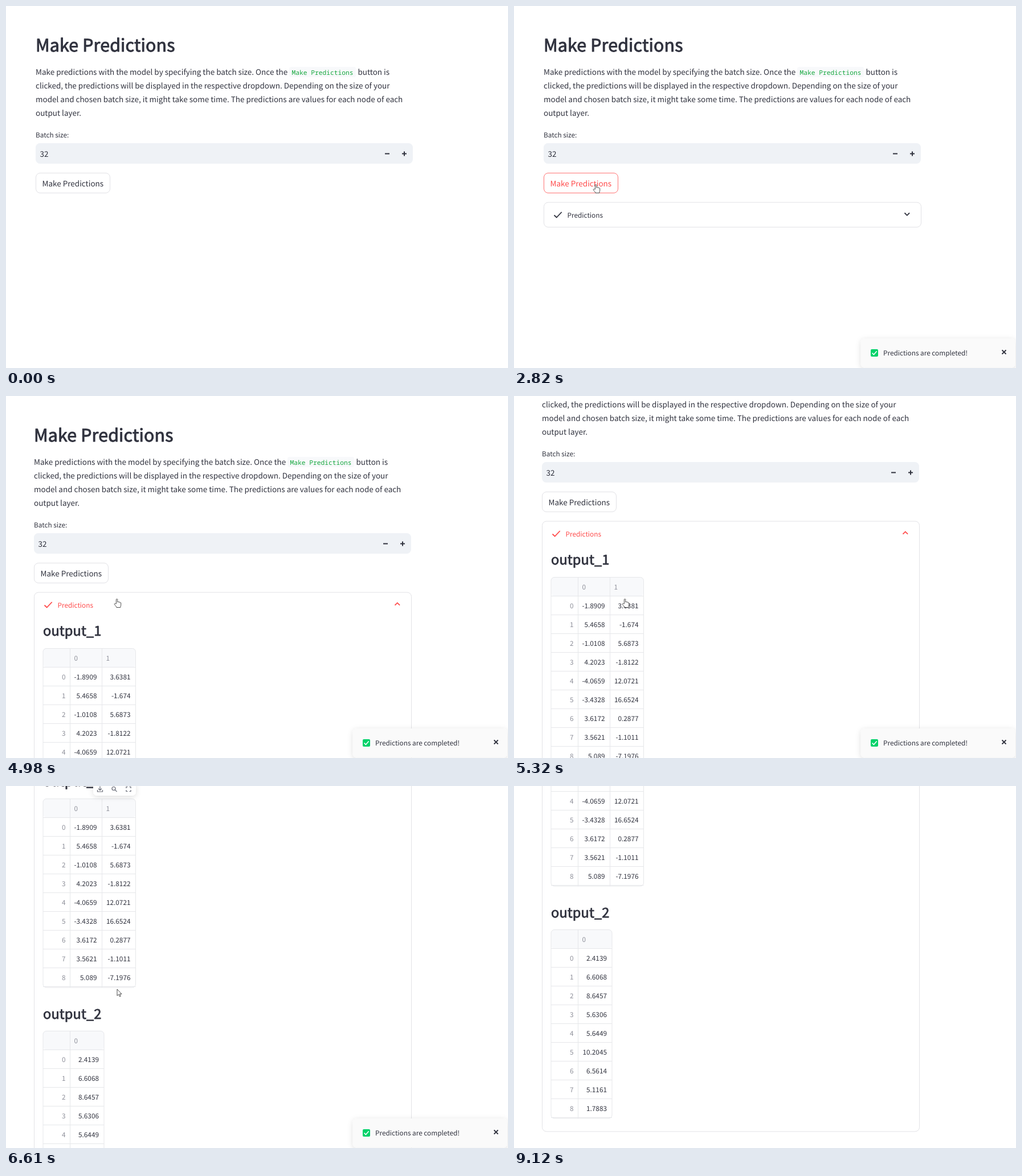
Write an HTML page that moves like this. It is 881x636 px and loops after 9570 ms.

```html
<!DOCTYPE html>
<html lang="en">
<head>
<meta charset="utf-8">
<title>Make Predictions</title>
<style>
  html, body { margin: 0; width: 100%; height: 100%; overflow: hidden; background: #fff; }
  svg { display: block; width: 100%; height: 100%; }
  text {
    font: 13.49px "Noto Sans CJK JP", "Noto Sans CJK SC", "Noto Sans CJK", "Open Sans", sans-serif;
    fill: #31333f; text-rendering: geometricPrecision; white-space: pre;
  }
  text.small { font-size: 11.8px; }
  /* Semibold: the regular weight, thickened by a thin outline */
  text.h2, text.h3 { stroke: #31333f; stroke-linejoin: round; letter-spacing: .005em; }
  text.h2 { font-size: 30.35px; stroke-width: 1; }
  text.h3 { font-size: 23.6px; stroke-width: .85; }
  text.code { font: 11.25px "Noto Sans Mono", "DejaVu Sans Mono", monospace; fill: #17a83f; }
  text.dim { fill: #8e909a; }
  text.right { text-anchor: end; }
  text.tint { fill: currentColor; }
  .line { fill: none; stroke: currentColor; stroke-width: 1.8; }
  .rule { fill: none; stroke: #e6e7ea; }
  .frame { fill: none; stroke: #e2e2e6; }
  .pointer { fill: #fff; stroke: #222; stroke-width: .8; stroke-linejoin: round; }
</style>
</head>
<body>
<svg viewBox="0 0 881 636" color="#31333f">
  <defs>
    <clipPath id="clip"><rect id="clipRect" x="50" y="344" width="668" height="0"/></clipPath>
    <filter id="shadow" x="-20%" y="-50%" width="140%" height="200%">
      <feDropShadow dx="0" dy="2" stdDeviation="5" flood-color="#000" flood-opacity=".13"/>
    </filter>
  </defs>

  <g id="page">
    <text class="h2" x="52" y="80">Make Predictions</text>
    <text x="52" y="120.5">Make predictions with the model by specifying the batch size. Once the</text>
    <rect x="497" y="107" width="117" height="18" rx="3.5" fill="#f8f9fb"/>
    <text class="code" x="501.5" y="120.5">Make Predictions</text>
    <text x="617.5" y="120.5">button is</text>
    <text x="52" y="144.5">clicked, the predictions will be displayed in the respective dropdown. Depending on the size of your</text>
    <text x="52" y="168.5">model and chosen batch size, it might take some time. The predictions are values for each node of each</text>
    <text x="52" y="192.5">output layer.</text>

    <text class="small" x="52" y="230.5">Batch size:</text>
    <rect x="52" y="241" width="662" height="36" rx="7.5" fill="#eff2f6"/>
    <text x="59.5" y="264.5">32</text>
    <path class="line" style="stroke-width:2" d="M665 259.5h8M695 259.5h8M699 255.5v8"/>

    <rect id="button" x="52.5" y="293.5" width="130" height="35" rx="7.5"/>
    <text id="buttonText" x="63.5" y="316.5">Make Predictions</text>

    <g id="panel">
      <rect id="panelFrame" class="frame" x="52.5" y="345" width="662" rx="7.5"/>
      <g id="header">
        <path class="line" d="M70.5 367.5l4.2 4 9-9.5"/>
        <text class="small tint" x="93.5" y="371.5">Predictions</text>
        <path id="chevron" class="line" d="M685.5 363.5l4.3 4.3 4.3-4.3"/>
      </g>
      <g id="outputs" clip-path="url(#clip)"></g>
      <g id="toolbar">
        <rect x="156" y="415" width="75" height="23" rx="7" fill="#fff" filter="url(#shadow)"/>
        <g fill="none" stroke="#666975" stroke-width="1.2">
          <path d="M168 421.5v6.5M165 425.5l3 3 3-3M163.5 428v3h9v-3"/>
          <circle cx="192" cy="425.5" r="3"/><path d="M194.2 427.7l3.3 3.3"/>
          <path d="M214 425v-2.5h2.5M219.5 422.5h2.5v2.5M222 428v2.5h-2.5M216.5 430.5h-2.5v-2.5"/>
        </g>
      </g>
      <path id="link" transform="translate(33 812) scale(.62)" fill="none" stroke="#555867" stroke-width="2"
        d="M10 13a5 5 0 0 0 7.54.54l3-3a5 5 0 0 0-7.07-7.07l-1.72 1.71M14 11a5 5 0 0 0-7.54-.54l-3 3a5 5 0 0 0 7.07 7.07l1.71-1.71"/>
    </g>
  </g>

  <g id="toast">
    <rect x="608.5" y="584" width="271.5" height="51.5" rx="7.5" fill="#fafafa" filter="url(#shadow)"/>
    <rect x="626" y="603" width="13" height="13" rx="2" fill="#00d26a"/>
    <path d="M628.5 609.5l2.9 3 5.2-6" fill="none" stroke="#fff" stroke-width="1.6"/>
    <text class="small" x="648" y="614">Predictions are completed!</text>
    <path class="line" d="M856.5 604.5l7 7M863.5 604.5l-7 7"/>
  </g>

  <g id="cursor">
    <path id="arrow" class="pointer" d="M0 0V11.5L2.7 9l1.8 4 1.8-.8L4.5 8.4H8z"/>
    <path id="hand" class="pointer" d="M-1.6 8V.8a1.2 1.2 0 0 1 2.4 0V5.2c.3-1 2-.9 2.2.2 .4-.8 2-.6 2 .5 .5-.5 1.7-.2 1.7 1V10.5c0 1.6-1 2.2-1 4H-1c0-1.6-3-4-3.6-5.4-.6-1.2.9-2 1.7-1.2z"/>
    <path id="beam" fill="none" stroke="#222" d="M-3-7.5h2.5M.5-7.5H3M0-7V7M-3 7.5h2.5M.5 7.5H3"/>
  </g>
</svg>

<script>
const LOOP = 9570, ROW = 33, RED = [255, 75, 75], INK = [49, 51, 63];
const $ = id => document.getElementById(id);
const set = (id, attrs) => { for (const k in attrs) $(id).setAttribute(k, attrs[k]); };
const show = (id, on) => set(id, { opacity: +on });

// Tables
const label = (cls, x, y, s) => `<text class="${cls}" x="${x}" y="${y}">${s}</text>`;

function table(title, baseline, top, edges, rows) {
  const left = 68, right = edges[edges.length - 1], height = ROW * 10 + 1.5;
  let out = label('h3', left, baseline, title) +
    `<rect x="${left}" y="${top}" width="${right - left}" height="${ROW}" rx="6" fill="#f8f9fb"/>`;
  for (let i = 1; i <= 10; i++) out += `<path class="rule" d="M${left} ${top + i * ROW}H${right}"/>`;
  edges.slice(0, -1).forEach((x, c) => {
    out += `<path class="rule" d="M${x} ${top}v${height}"/>` + label('small dim', x + 7, top + 21, c);
  });
  rows.forEach((row, r) => {
    const y = top + 21 + (r + 1) * ROW;
    out += label('small dim right', 107.5, y, r);
    row.split(' ').forEach((v, c) => out += label('small right', edges[c + 1] - 9, y, v));
  });
  return out + `<rect class="rule" x="${left}" y="${top}" width="${right - left}" height="${height}" rx="6"/>`;
}

$('outputs').innerHTML =
  table('output_1', 420.5, 443.5, [115.5, 171.5, 230.5], [
    '-1.8909 3.6381', '5.4658 -1.674', '-1.0108 5.6873', '4.2023 -1.8122', '-4.0659 12.0721',
    '-3.4328 16.6524', '3.6172 0.2877', '3.5621 -1.1011', '5.089 -7.1976']) +
  table('output_2', 829.5, 851.5, [115.5, 175], [
    '2.4139', '6.6068', '8.6457', '5.6306', '5.6449', '10.2045', '6.5614', '5.1161', '1.7883']);

// Timing
const ramp = (t, a, b) => Math.min(1, Math.max(0, (t - a) / (b - a)));
const smooth = u => u * u * (3 - 2 * u);
const easeIn = u => u * u;
const easeOut = u => 1 - (1 - u) ** 2;
const within = (t, a, b) => t >= a && t < b;
const mix = (a, b, u) => `rgb(${a.map((v, i) => Math.round(v + (b[i] - v) * u))})`;

function scrollAt(t) {
  return Math.round(
    124 * easeIn(ramp(t, 4960, 5320)) + 132 * easeOut(ramp(t, 5320, 5600)) +
    164 * easeIn(ramp(t, 6430, 6610)) + 179 * easeOut(ramp(t, 6610, 6880)));
}

// Each move: start time, end time, dx, dy, easing
const moves = [
  [540, 1540, -676, -311, smooth],
  [3370, 3890, 51, 43, smooth],
  [7850, 8850, 616, 259, smooth],
  [8850, 9120, 34, 20, u => u],
];
function cursorAt(t) {
  let x = 820, y = 625;
  for (const [a, b, dx, dy, ease] of moves) {
    const u = ease(ramp(t, a, b));
    x += dx * u;
    y += dy * u;
  }
  return [x, y];
}

function pointerKind(t, x, y) {
  if (t < 3370) return x < 183 && y < 329 ? 'hand' : 'arrow';
  if (t < 6000) return y < 329 || y > 345 ? 'hand' : 'arrow';
  return within(t, 6680, 7340) ? 'beam' : 'arrow';
}

function draw(t) {
  const [x, y] = cursorAt(t);
  const kind = pointerKind(t, x, y);
  set('cursor', { transform: `translate(${x.toFixed(1)} ${y.toFixed(1)})` });
  show('cursor', within(t, 580, 9120));
  for (const id of ['arrow', 'hand', 'beam']) show(id, id === kind);

  const pressed = within(t, 2280, 2350);
  const active = t < 4220 && (t >= 3370 || kind === 'hand');
  set('button', { fill: pressed ? '#ff4b4b' : '#fff', stroke: active ? '#ff7474' : '#e2e2e6' });
  $('buttonText').style.fill = pressed ? '#fff' : active ? '#ff4b4b' : '#31333f';

  const opened = 1 - (1 - ramp(t, 4190, 4580)) ** 3;
  const height = 43.5 + 817.5 * opened;
  show('panel', t >= 2420);
  set('panelFrame', { height });
  set('clipRect', { height });
  set('outputs', { visibility: opened ? 'visible' : 'hidden' });
  set('chevron', { transform: `rotate(${-180 * opened} 689.8 365.6)` });
  set('header', { color: mix(INK, RED, ramp(t, 3680, 3870) - ramp(t, 5890, 6140)) });
  set('toolbar', { opacity: ramp(t, 5900, 6140) });
  set('link', { opacity: ramp(t, 6640, 6800) - ramp(t, 7230, 7470) });

  // The scrollbar narrows the page once it overflows.
  set('page', { transform: `translate(${height > 260 ? -3 : 0} ${-scrollAt(t)})` });
  set('toast', { opacity: ramp(t, 2450, 2800) - ramp(t, 6630, 6880) });
}

function tick(now) {
  draw(now % LOOP);
  requestAnimationFrame(tick);
}
draw(0);
requestAnimationFrame(tick);
</script>
</body>
</html>
```
